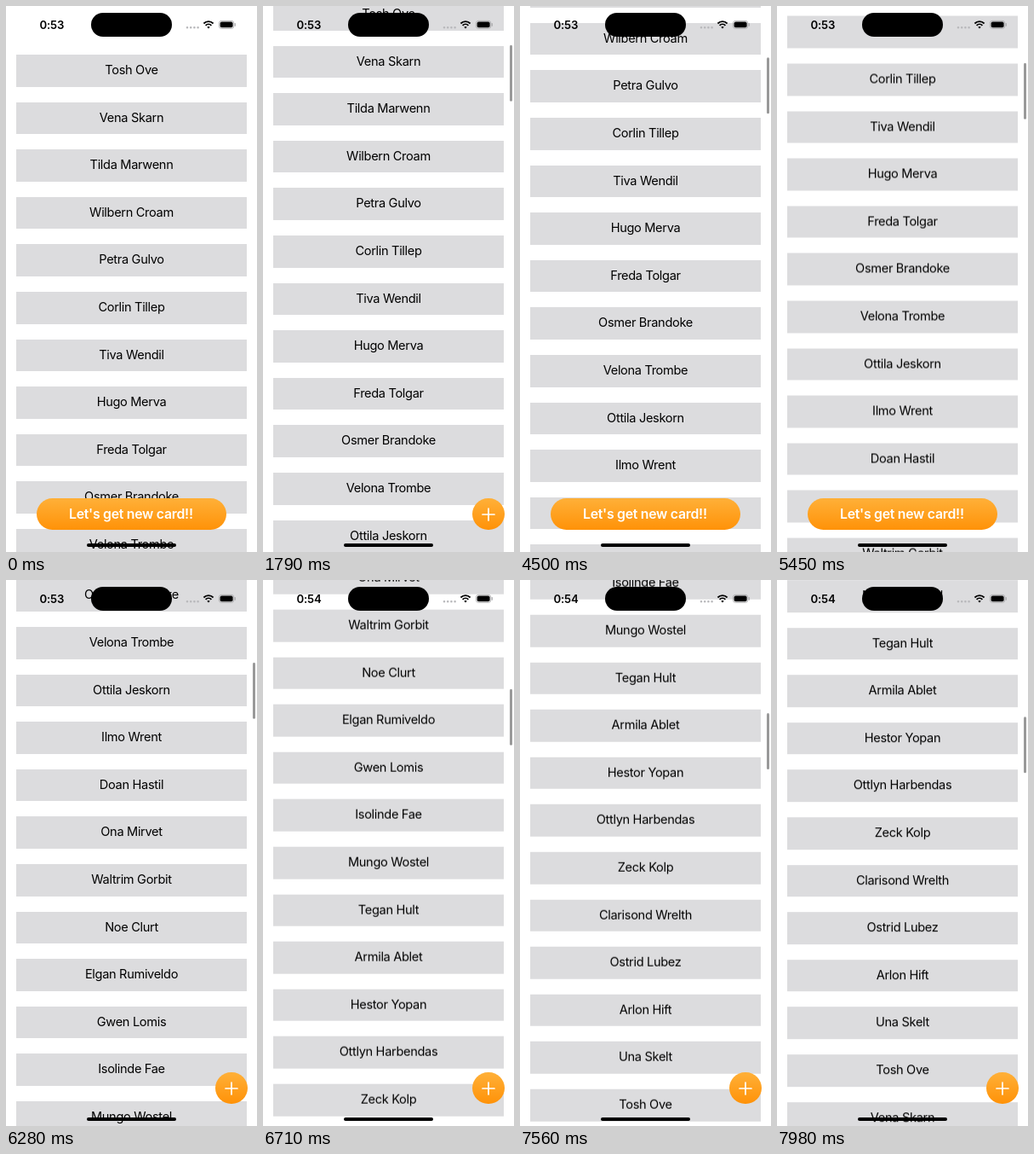
An HTML page that plays this animation: 295 by 640 pixels, repeating every 8 s.

```html
<!DOCTYPE html>
<html lang="en">
<head>
<meta charset="utf-8">
<title>Card list</title>
<style>
  html, body { margin: 0; width: 100%; height: 100%; overflow: hidden; background: #fff; }
  body { position: relative; font-family: Inter, sans-serif; color: #000; }
  body > *, .card { position: absolute; }
  #list { left: 12px; top: 56.5px; width: 271px; will-change: transform; }
  .card {
    width: 100%; height: 37.5px; background: #dcdcde;
    font-size: 14.6px; line-height: 37.5px; letter-spacing: -.33px; text-align: center;
  }
  #bar { left: 290.3px; top: 39.2px; width: 2.4px; height: 66px; border-radius: 2px; background: rgba(0, 0, 0, .4); }
  #pill, #plus {
    top: 576.7px; height: 37.8px; border-radius: 19px;
    background: linear-gradient(#ffb038, #ff9208);
  }
  #label {
    position: absolute; left: 38px; right: 37px; height: 100%; overflow: hidden; white-space: nowrap;
    color: #fff; font-size: 15.8px; font-weight: 600; line-height: 38px; letter-spacing: -.25px;
  }
  #plus { width: 38px; }
  #plus svg { display: block; }
  #island { left: 100px; top: 8.3px; width: 94.5px; height: 28px; border-radius: 14px; background: #000; }
  #clock { left: 39.5px; top: 14px; font-size: 13.2px; font-weight: 600; line-height: 16px; letter-spacing: -.2px; }
  #status { left: 0; top: 0; }
  #home { left: 95px; top: 630.3px; width: 105px; height: 3.7px; border-radius: 2px; background: #000; }
</style>
</head>
<body>
<div id="list"></div>
<div id="bar"></div>
<div id="pill"><div id="label">Let's get new card!!</div></div>
<div id="plus">
  <svg width="38" height="38"><path d="M12 19h14M19 12v14" stroke="#fff" stroke-width="1.7" stroke-linecap="round"/></svg>
</div>
<div id="island"></div>
<div id="clock"></div>
<svg id="status" width="295" height="40" fill="none">
  <path d="M213 25.2h13" stroke="#b8b8bb" stroke-width="2.6" stroke-linecap="round" stroke-dasharray="0 4.2"/>
  <path d="M232.4 20.5a8 8 0 0 1 11.2 0M234.6 22.8a4.9 4.9 0 0 1 6.8 0" stroke="#000" stroke-width="1.8"/>
  <path d="M238 26.6l-1.7-1.8a2.4 2.4 0 0 1 3.4 0z" fill="#000"/>
  <rect x="250.4" y="17.4" width="17.4" height="9" rx="2.8" stroke="#a5a5a8" stroke-width=".8"/>
  <rect x="251.6" y="18.6" width="15" height="6.6" rx="1.8" fill="#000"/>
  <path d="M269.2 20.6v2.6" stroke="#a5a5a8" stroke-width="1.2" stroke-linecap="round"/>
</svg>
<div id="home"></div>
<script>
const names = `Tosh Ove,Vena Skarn,Tilda Marwenn,Wilbern Croam,Petra Gulvo,Corlin Tillep,
Tiva Wendil,Hugo Merva,Freda Tolgar,Osmer Brandoke,Velona Trombe,Ottila Jeskorn,
Ilmo Wrent,Doan Hastil,Ona Mirvet,Waltrim Gorbit,Noe Clurt,Elgan Rumiveldo,
Gwen Lomis,Isolinde Fae,Mungo Wostel,Tegan Hult,Armila Ablet,Hestor Yopan,
Ottlyn Harbendas,Zeck Kolp,Clarisond Wrelth,Ostrid Lubez,Arlon Hift,Una Skelt`.split(/,\s*/);

const LOOP = 8000, PITCH = 55.6, ROWS = 34;
const FLICK = 6280, SLOW = 7160;

// time, scroll offset, button collapse (0 = wide pill, 1 = round plus)
const poses = [
  [0, 0, 0],
  [1310, 14, 0], [1430, 42, .6], [1560, 62, .95], [1790, 66, 1],
  [2040, 66.6, .99], [2140, 67, .96], [2300, 67, 0],
  [2940, 139, .77], [3050, 168, .95], [3150, 188, 1], [3340, 196, 1],
  [3760, 196, .07], [3950, 196, 0],
  [4500, 204, 0], [4610, 240, .6], [4720, 261, .96], [4860, 267, 1], [5020, 267.5, 1],
  [5450, 267.5, 0],
  [6050, 285, .3], [6160, 405, .9]
];

const el = id => document.getElementById(id);
const [list, bar, pill, plus, clock] = ['list', 'bar', 'pill', 'plus', 'clock'].map(el);

for (let i = 0; i < ROWS; i++) {
  const card = document.createElement('div');
  card.className = 'card';
  card.style.top = i * PITCH + 'px';
  card.textContent = names[i % names.length];
  list.append(card);
}

const stepped = (t, size) => Math.floor(t / size) * size;

// The long flick coasts with exponential friction, seen in coarse steps.
function coast(t) {
  const dt = t < SLOW ? stepped(t - FLICK, 110) : SLOW - FLICK + stepped(t - SLOW, 102.5);
  return 1193 - 635 * Math.exp(-dt / 520);
}

function poseAt(t) {
  if (t >= FLICK) return [coast(t), 1];
  return poses.findLast(p => p[0] <= t).slice(1);
}

function draw() {
  const t = performance.now() % LOOP;
  const [scroll, p] = poseAt(t);
  const left = 36 + 210 * p, right = 259 + 25 * p;

  list.style.transform = `translateY(${-scroll}px)`;
  bar.style.transform = `translateY(${scroll * .1037}px)`;
  bar.style.opacity = scroll > 0 ? 1 : 0;

  pill.style.left = left + 'px';
  pill.style.width = right - left + 'px';
  pill.style.opacity = 1 - p * p;
  plus.style.left = right - 38 + 'px';
  plus.style.opacity = Math.min(1, p * 1.2);

  clock.textContent = t < 6710 ? '0:53' : '0:54';
  requestAnimationFrame(draw);
}
draw();
</script>
</body>
</html>
```
